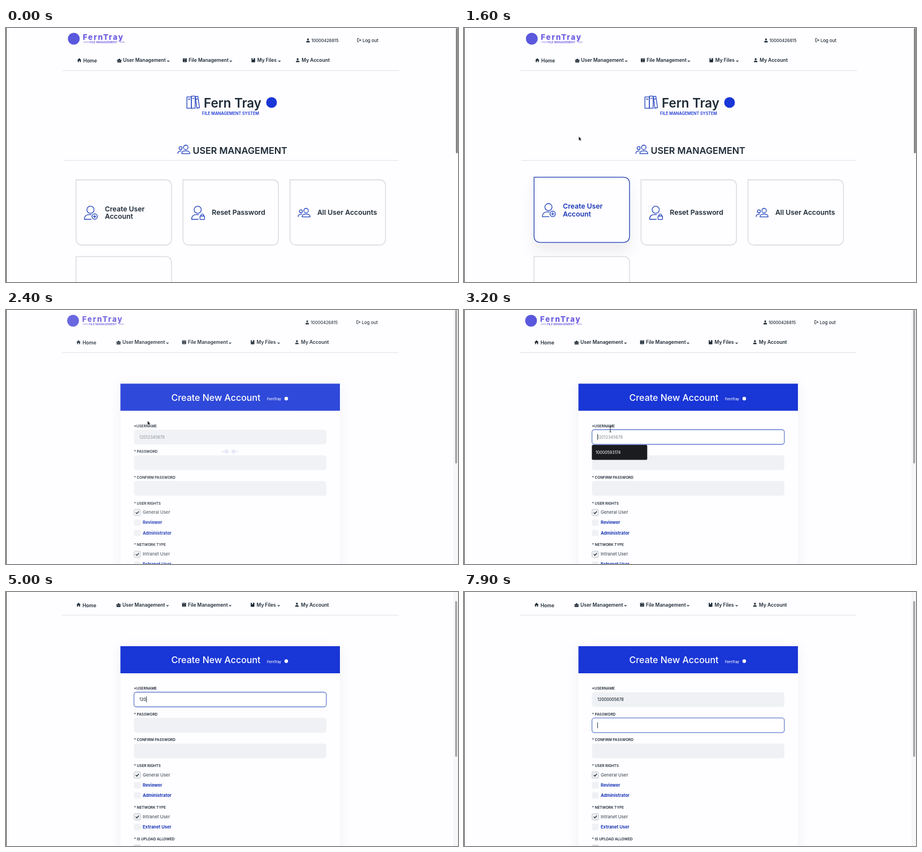
These frames come from a looping animation (800 px wide and 450 px high, 8 s). An HTML page:

```html
<!DOCTYPE html>
<html lang="en">
<head>
<meta charset="utf-8">
<title>File management</title>
<style>
html, body { margin: 0; width: 100%; height: 100%; overflow: hidden; background: #fefdff; }
svg { display: block; width: 800px; height: 450px; font-family: Inter, "Open Sans", sans-serif; }
text { white-space: pre; }
.line { fill: none; stroke: #2444bd; stroke-width: 1.3; stroke-linecap: round; stroke-linejoin: round; }
.panel { filter: drop-shadow(0 4px 10px rgba(30, 45, 90, .07)); }
</style>
</head>
<body>
<svg id="stage" viewBox="0 0 800 450"></svg>
<script>
const INK = '#1d2a36', BLUE = '#1936d6', LINK = '#1937b5', FIELD = '#eff1f4', RULE = '#dfe1e4', EDGE = '#d4d7dc';
const BRAND = 'FernTray', PHONE = '10000426815', TYPED = '12000005678';

const text = (x, y, s, size, weight = 500, fill = INK, more = '') =>
  `<text x="${x}" y="${y}" font-size="${size}" font-weight="${weight}" fill="${fill}" ${more}>${s}</text>`;
const rect = (x, y, w, h, fill, more = '') =>
  `<rect x="${x}" y="${y}" width="${w}" height="${h}" fill="${fill}" ${more}/>`;
const dot = (x, y, r, fill, more = '') => `<circle cx="${x}" cy="${y}" r="${r}" fill="${fill}" ${more}/>`;
const rule = (x1, x2, y, color = RULE) => `<path d="M${x1} ${y}H${x2}" stroke="${color}"/>`;
const path = (d, more = '') => `<path d="${d}" ${more}/>`;
const at = (x, y, s) => `<g transform="translate(${x} ${y})">${s}</g>`;

// Icons
const person = dot(3, 1.7, 1.7, INK) + path('M0 7V5.8Q0 4.2 3 4.2T6 5.8V7Z', `fill="${INK}"`);
const house = path('M0 3.8L3.7 0L7.4 3.8H6.4V7H4.6V4.6H2.8V7H1V3.8Z', `fill="${INK}"`);
const basket = path('M2 2.8Q4 -1.4 6 2.8H8V4.6H0V2.8ZM.5 5.1H7.5V7.4H.5Z', `fill="${INK}"`);
const folder = rect(0, .3, 7, 6.6, INK, 'rx=".8"') + path('M1.4 1.8H5.6M2.2 5.3H4.8', 'stroke="#fff" stroke-width=".7"');
const book = rect(0, 0, 6.4, 7.2, INK, 'rx=".8"') + path('M1.9 0V3L2.9 2.2L3.9 3V0Z', 'fill="#fff"');
const exit = path('M3.6 .6H.6V6.4H3.6M2.4 3.5H6.6M4.9 1.7L6.7 3.5L4.9 5.3', `fill="none" stroke="${INK}" stroke-width=".9"`);
const chevron = path('M0 0L1.9 1.9L3.8 0', `fill="none" stroke="${INK}" stroke-width="1.1"`);
const bigUser = '<circle cx="11.5" cy="7" r="6.3"/><path d="M12.5 24H.8V22Q2 16.2 8 15.6H13"/>';
const userPlus = `<g class="line">${bigUser}<circle cx="19" cy="19" r="4.8"/><path d="M16.6 19H21.4M19 16.6V21.4"/></g>`;
const userLock = `<g class="line">${bigUser}<rect x="15.6" y="18" width="8" height="6.3" rx="1"/><path d="M17.4 18V16Q19.6 12.6 21.8 16V18"/></g>`;
const group = '<g class="line"><circle cx="14.5" cy="5" r="4"/><circle cx="5.3" cy="6.3" r="2.7"/>' +
  '<path d="M7.5 16.2V15Q8.5 11.2 14.5 11.2T21.5 15V16.2ZM.6 15.8V14.6Q1.2 11.4 6.6 11.4"/></g>';
const shelf = '<g class="line"><rect x=".7" y="2.2" width="8" height="20"/><rect x="8.7" y=".7" width="6.6" height="21.5"/>' +
  '<path d="M15.6 1.8L20 .9L23 21L18.4 22ZM3.2 6H6.2M10.8 4.6H13.2M17.4 6L19.4 5.6"/></g>';

// Shared top bar
const navItem = (x, icon, tx, label, arrow, y = 60.3) =>
  at(x, 53.5, icon) + text(tx, y, label, 8.5, 600) + (arrow ? at(arrow, 57.6, chevron) : '');
const nav = dot(120, 19, 10.5, '#5a58dd') +
  text(136, 21.4, BRAND, 13.4, 800, '#6a5be0', 'letter-spacing="1.8"') +
  rule(137, 147, 25, '#8f86e6') + rule(201, 210, 25, '#8f86e6') +
  text(148, 26.8, 'FILE MANAGEMENT', 5.1, 600, '#6a5be0') +
  at(531.5, 18.4, person) + text(540.5, 24.6, PHONE, 7.35) +
  at(621.5, 18, exit) + text(631, 24.6, 'Log out', 7.8) +
  navItem(126, house, 136.8, 'Home', 0, 61.2) +
  navItem(196.5, basket, 207.3, 'User Management', 285.2) +
  navItem(313, folder, 323.3, 'File Management', 396) +
  navItem(434.5, book, 444.8, 'My Files', 482) +
  navItem(513.2, person, 523.3, 'My Account') +
  rule(100, 696, 75.5);

// Home page
const outline = 'M0 0H157.5Q169 0 169 11.5V104Q169 115.5 157.5 115.5H11.5Q0 115.5 0 104Z';
const card = (x, y, s, id = '') =>
  `<g transform="translate(${x} ${y})"><g${id && ` id="${id}"`}><path d="${outline}" fill="#fefdff" stroke="${EDGE}" stroke-width="1.3"/>${s}</g></g>`;
const cardText = (x, y, s) => text(x, y, s, 12.25, 600);
const home = at(319.5, 120, shelf) + text(350, 140.7, 'Fern Tray', 22.4, 600) + dot(470, 132, 9.5, BLUE) +
  text(347, 153.8, 'FILE MANAGEMENT SYSTEM', 7.15, 600, BLUE) +
  at(303.7, 206.5, group) + text(330.5, 223.2, 'USER MANAGEMENT', 16.25, 600) + rule(102, 694, 234.5) +
  card(124, 269, at(14, 46, userPlus) + cardText(51, 55.5, 'Create User') + cardText(51, 69.3, 'Account'), 'hot') +
  card(313.3, 269, at(14.5, 46, userLock) + cardText(51, 62.3, 'Reset Password')) +
  card(502.6, 269, at(14, 49.5, group) + cardText(48.3, 62.3, 'All User Accounts')) +
  card(124, 404.8, '');

// Form page
const label = (y, s) => text(226.5, y + 2.4, s, 6.4, 600);
const field = (y, id) => rect(226.5, y, 340.5, 26, FIELD, `rx="4.5" id="${id}" stroke-width="1.3"`);
const option = (y, s, on) =>
  rect(226.6, y - 5.4, 11.4, 11.2, FIELD, `rx="2" ${on ? 'stroke="#b9bec6" stroke-width=".9"' : ''}`) +
  (on ? path(`M229.6 ${y + .2}L231.6 ${y + 2.2}L235.2 ${y - 1.8}`, `fill="none" stroke="${INK}" stroke-width="1.3"`) : '') +
  text(242, y + 2.8, s, on ? 7.75 : 7.6, on ? 500 : 700, on ? '#4d5863' : LINK);
const form = rect(202.5, 130.5, 388.5, 420, '#fefdff', 'class="panel"') + rect(202.5, 130.5, 388.5, 48, BLUE) +
  text(292.5, 160.6, 'Create New Account', 16, 500, '#fff') +
  text(462, 160, BRAND, 6, 500, '#fff') + dot(496, 157, 3.2, '#fff') +
  label(205.2, '*USERNAME') + field(212, 'user') + text(236, 227.6, '', 7, 500, INK, 'id="value"') +
  label(251, '* PASSWORD') + field(257.6, 'pass') +
  label(296.5, '* CONFIRM PASSWORD') + field(303, 'confirm') +
  label(342.2, '* USER RIGHTS') + option(358.6, 'General User', 1) + option(376.6, 'Reviewer') + option(394.8, 'Administrator') +
  label(416, '* NETWORK TYPE') + option(432.6, 'Intranet User', 1) + option(450.6, 'Extranet User') +
  label(472, '* IS UPLOAD ALLOWED') + option(488.4, 'Allowed', 1) +
  rect(0, 0, .9, 10.5, INK, 'id="caret"') +
  `<g id="hint">${rect(226.3, 239, 98, 26.5, '#1a1c20', 'rx="2"')}${text(233, 254.8, '10000593174', 6.9, 500, '#e8e9eb')}</g>`;

const stage = document.getElementById('stage');
stage.innerHTML = rect(0, 0, 800, 450, '#fefdff') +
  `<g id="home">${home}</g><g id="form">${form}</g><g id="nav">${nav}</g>` +
  `<g id="loader">${rect(1, 0, 792, 450, '#fefdff')}${dot(0, 250.7, 3.6, BLUE, 'class="ball"').repeat(4)}</g>` +
  rect(793, 0, 7, 450, '#f8f8fa', 'id="track" stroke="#ececef" stroke-width=".8"') +
  rect(0, 0, 3.4, 0, '#8a8a8c', 'id="thumb" rx="1.7"') + rect(0, 0, 1, 450, '#3c3c3e') +
  path('M0 0V7.6L1.8 6L3 8.7L4.3 8.1L3.1 5.5H5.4Z', 'id="arrow" fill="#111" stroke="#fff" stroke-width=".5"') +
  path('M-1.8 -4.8Q0 -4.8 0 -3.6Q0 -4.8 1.8 -4.8M0 -3.6V3.6M-1.8 4.8Q0 4.8 0 3.6Q0 4.8 1.8 4.8',
    'id="beam" fill="none" stroke="#222" stroke-width=".9"');

const $ = id => document.getElementById(id);
const balls = [...document.querySelectorAll('.ball')];
const set = (el, props) => { for (const k in props) el.setAttribute(k, props[k]); };
const show = (el, on) => set(el, { visibility: on ? 'visible' : 'hidden' });
const ramp = (t, a, b) => Math.min(1, Math.max(0, (t - a) / (b - a)));
const ease = p => .5 - Math.cos(Math.PI * p) / 2;
const mix = (a, b, p) => a + (b - a) * p;

// Timing, in ms
const OPEN = 1750, FOCUS = 2850, SCROLL = 3300, NEXT = 7700;
const keys = [4500, 4700, 4900, 5600, 5800, 6000, 6200, 6900, 7050, 7200, 7350];
const moves = [[100, 550, 12], [800, 230, 300], [1200, 230, 300], [1600, 203, 192], [1800, 212, 190],
  [2100, 245, 186.5], [2800, 259, 211.5], [8000, 259, 211.5]];

function drawPointer(t) {
  const i = Math.max(1, moves.findIndex(m => m[0] > t));
  const [a, b] = [moves[i - 1], moves[i]], p = ease(ramp(t, a[0], b[0]));
  const place = { transform: `translate(${mix(a[1], b[1], p)} ${mix(a[2], b[2], p)})` };
  const inField = t >= 2780;
  set($('arrow'), place);
  set($('beam'), place);
  show($('arrow'), t >= 100 && !inField);
  show($('beam'), inField && t < keys[0]);
}

function drawHover(t) {
  const h = ease(ramp(t, 740, 1040)), hot = $('hot');
  const blend = (a, b) => `rgb(${a.map((v, i) => Math.round(mix(v, b[i], h)))})`;
  set(hot, { transform: `translate(0 ${-4.7 * h})` });
  const frame = hot.firstElementChild;
  set(frame, { stroke: blend([212, 215, 220], [30, 60, 178]) });
  frame.style.filter = `drop-shadow(0 16px 12px rgba(30,40,60,${.075 * h}))`;
  hot.querySelectorAll('text').forEach(el => set(el, { fill: blend([29, 42, 54], [25, 55, 181]) }));
}

function drawLoader(t) {
  show($('loader'), t >= OPEN && t < 2520);
  set($('loader'), { opacity: 1 - ease(ramp(t, 1920, 2520)) });
  // Closed form of cubic-bezier(0, 1, 1, 0)
  const x = (t + 251) % 600 / 600, v = -2 * Math.sin(Math.asin(1 - 2 * x) / 3), p = (1 + v ** 3) / 2;
  [[0, p], [p, 1], [1 + p, 1], [2, 1 - p]].forEach(([step, size], i) =>
    set(balls[i], { cx: 384 + 12.5 * step, r: 3.6 * size }));
}

function drawForm(t) {
  const count = keys.filter(k => k <= t).length, inPass = t >= NEXT, focused = t >= FOCUS;
  const focusStyle = on => ({ fill: on ? '#fff' : FIELD, stroke: on ? '#6680cf' : 'none' });
  set($('user'), focusStyle(focused && !inPass));
  set($('pass'), focusStyle(inPass));
  const value = $('value');
  value.textContent = count ? TYPED.slice(0, count) : '12012345678';
  set(value, { fill: count ? INK : '#8c9299' });
  const since = t - (inPass ? NEXT : count ? keys[count - 1] : FOCUS);
  show($('caret'), focused && since % 1000 < 500);
  set($('caret'), {
    x: inPass || !count ? 236 : 236.3 + value.getComputedTextLength(),
    y: inPass ? 265.3 : 219.6
  });
  show($('hint'), focused && t < SCROLL);
}

function draw(now) {
  const t = now % 8000, opened = t >= OPEN, p = ease(ramp(t, SCROLL, 3560)), y = -34.5 * p;
  $('home').style.display = opened ? 'none' : '';
  $('form').style.display = opened ? '' : 'none';
  set($('nav'), { transform: `translate(${opened ? -1.3 : 0} ${y})` });
  set($('form'), { transform: `translate(0 ${y})` });
  show($('track'), opened);
  set($('thumb'), { x: opened ? 795 : 796.3, y: 16 * p, height: opened ? 272 + 4 * p : 222, fill: opened ? '#a4a4a7' : '#7e7e80' });
  drawHover(t);
  if (opened) drawForm(t);
  else ['caret', 'hint'].forEach(id => show($(id), false));
  drawLoader(t);
  drawPointer(t);
  requestAnimationFrame(draw);
}
requestAnimationFrame(draw);
</script>
</body>
</html>
```
